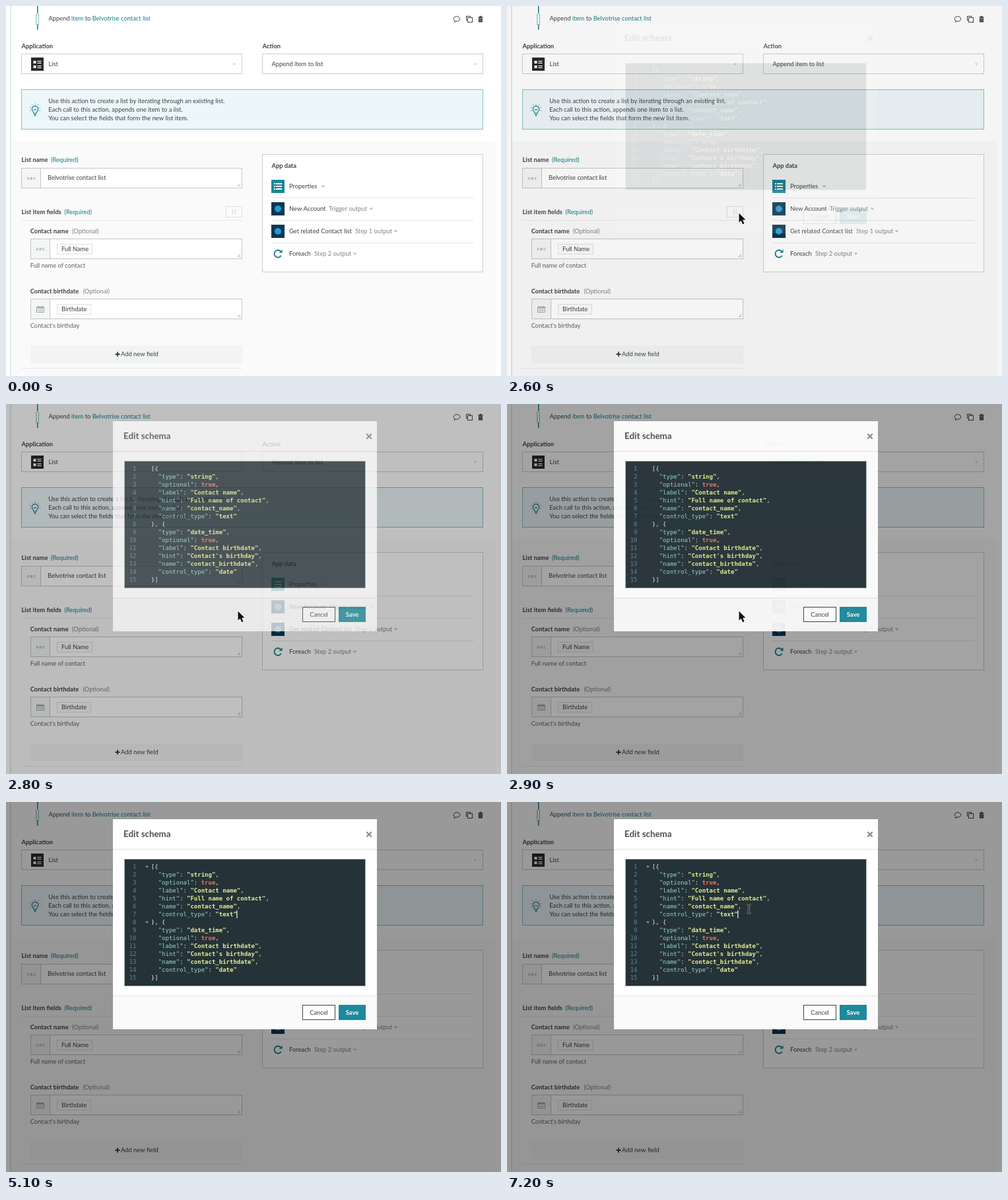
These frames come from a looping animation (750x560 px, 7.3 s). An HTML page with a canvas:

```html
<!DOCTYPE html>
<html lang="en">
<head>
<meta charset="utf-8">
<style>
html, body { margin: 0; width: 100%; height: 100%; overflow: hidden; background: #fff; }
canvas { display: block; width: 750px; height: 560px; }
</style>
</head>
<body>
<canvas id="stage" width="750" height="560"></canvas>
<script>
const W = 750, H = 560, LOOP = 7300, STEP = 100;
const INK = '#3d4242', GREY = '#7f8383', TEAL = '#127a89', RULE = '#cbcdcd';
const SANS = 'Lato, sans-serif', MONO = '"DejaVu Sans Mono", monospace';
const BODY = `9.36px ${SANS}`, BOLD = `bold 9.36px ${SANS}`;
const LIST = 'Belvotrise contact list';

const stage = document.getElementById('stage').getContext('2d');
let g = stage;

function layer(draw) {
  const canvas = document.createElement('canvas');
  canvas.width = W;
  canvas.height = H;
  g = canvas.getContext('2d');
  draw();
  g = stage;
  return canvas;
}

// y is the middle of the capitals; returns the x where the text ends
function text(s, x, y, color = INK, font = BODY, align = 'left') {
  g.font = font;
  g.fillStyle = color;
  g.textAlign = align;
  g.fillText(s, x, y + 3.2);
  return x + g.measureText(s).width;
}

function rect(x, y, w, h, color) {
  g.fillStyle = color;
  g.fillRect(x, y, w, h);
}

function frame(x, y, x2, y2, fill, border = RULE) {
  rect(x, y, x2 - x, y2 - y, fill);
  g.strokeStyle = border;
  g.lineWidth = 1;
  g.strokeRect(x + .5, y + .5, x2 - x - 1, y2 - y - 1);
}

function path(points, color, width = 1) {
  g.beginPath();
  points.forEach(([x, y]) => g.lineTo(x, y));
  g.strokeStyle = color;
  g.lineWidth = width;
  g.stroke();
}

function dot(x, y, r, color) {
  g.beginPath();
  g.arc(x, y, r, 0, 7);
  g.fillStyle = color;
  g.fill();
}

function arc(x, y, r, from, to, color, width) {
  g.beginPath();
  g.arc(x, y, r, from, to);
  g.strokeStyle = color;
  g.lineWidth = width;
  g.stroke();
}

function triangle(x, y, r, color) {
  g.beginPath();
  g.moveTo(x - r, y - r / 2);
  g.lineTo(x + r, y - r / 2);
  g.lineTo(x, y + r / 2 + .5);
  g.fillStyle = color;
  g.fill();
}

function dotted(x, x2, y, color = '#d6d8d8') {
  g.setLineDash([1, 1]);
  path([[x, y + .5], [x2, y + .5]], color);
  g.setLineDash([]);
}

function select(x, label, value, valueX) {
  text(label, x + .5, 61, INK, BOLD);
  frame(x, 72, x + 335, 103, '#fff');
  text(value, valueX, 88);
  triangle(x + 323, 88, 2.3, '#cfd1d1');
}

function input(x, y, addonEnd) {
  frame(x, y, 358, y + 31, '#fff', '#c4c6c6');
  frame(x, y, addonEnd, y + 31, '#f4f5f5', '#c4c6c6');
  path([[350.5, y + 28], [355, y + 23.5]], '#999', .8);
  path([[353, y + 28], [355, y + 26]], '#999', .8);
}

function abc(x, y) {
  ['A', 'B', 'C'].forEach((s, i) =>
    text(s, x + (i - 1) * 5, y - 1, '#999', `bold 5.4px ${SANS}`, 'center'));
}

function pill(s, x2, y) {
  frame(77, y - 8, x2, y + 8, '#fcfcfc', '#dfe1e1');
  text(s, 84, y);
}

function headerIcons() {
  // speech bubble
  g.beginPath();
  g.ellipse(683, 19.5, 4.8, 3.7, 0, 2.2, 8.1);
  g.lineTo(679, 24.3);
  g.closePath();
  g.strokeStyle = '#444';
  g.lineWidth = 1;
  g.stroke();
  // copy
  g.strokeRect(697.5, 15.5, 6, 6);
  frame(699, 17, 707, 25, '#fff', '#444');
  // bin
  rect(715.5, 16.5, 7, 1.4, '#333');
  rect(717.5, 15, 3, 1.5, '#333');
  rect(716, 18.5, 6, 6, '#333');
  [717.6, 719, 720.4].forEach(x => rect(x - .2, 19.4, .5, 4, '#ccc'));
}

function bulb() {
  arc(44, 156, 4.7, 2.2, 7.2, TEAL, 1.2);
  path([[41.2, 159.8], [42, 162.5], [46, 162.5], [46.8, 159.8]], TEAL, 1.2);
  path([[42, 164.5], [46, 164.5]], TEAL, 1.1);
  path([[43, 166], [45, 166]], TEAL, 1);
  path([[42, 156], [43.3, 158], [44, 156], [44.7, 158], [46, 156]], TEAL, .7);
  for (let i = 0; i < 7; i++) {
    const a = Math.PI * (.9 + i * .2);
    dot(44 + 7.6 * Math.cos(a), 156 + 7.6 * Math.sin(a), .6, TEAL);
  }
}

function calendar() {
  g.strokeStyle = '#a6a9a9';
  g.lineWidth = 1;
  g.strokeRect(46.5, 455.5, 11, 8);
  rect(46.5, 455.5, 11, 2, '#a6a9a9');
  [49.5, 52, 54.5].forEach(x => path([[x, 457], [x, 463]], '#b4b6b6', .7));
  path([[47, 460.5], [57, 460.5]], '#b4b6b6', .7);
  [49, 55].forEach(x => rect(x - .5, 453.5, 1, 2, '#a6a9a9'));
}

function dataRow(y, label, note, noteX, caretX) {
  text(label, 429, y);
  if (note) text(note, noteX, y, GREY);
  triangle(caretX, y, 3, '#bfc2c2');
  if (y < 370) dotted(403, 709, y + 17, '#c8caca');
}

function drawPage() {
  rect(0, 0, W, H, '#fff');
  rect(7, 205, 735, H - 205, '#fafafa');
  rect(6.5, 0, 1, H, '#b5d7da');

  rect(47, 0, 1.5, 11, TEAL);
  rect(47, 28, 1.5, 8, TEAL);
  for (let y = 12; y < 28; y += 2.5)
    for (const x of [45.2, 48.8]) rect(x, y, 1.2, 1.2, TEAL);
  let x = text('Append ', 64.5, 19);
  x = text('item', x, 19, TEAL);
  x = text(' to ', x, 19);
  text(LIST, x, 19, TEAL);
  headerIcons();

  select(23, 'Application', 'List', 64.5);
  select(388, 'Action', 'Append item to list', 402.5);
  rect(38, 78, 19, 20, '#292b2c');
  for (const y of [83, 90]) {
    rect(41.5, y, 4, 4, '#fff');
    rect(47.5, y, 6, 1.2, '#fff');
    rect(47.5, y + 2.8, 6, 1.2, '#fff');
  }

  frame(23, 126, 723, 187, '#edf6f9', '#84bfca');
  bulb();
  ['Use this action to create a list by iterating through an existing list.',
   'Each call to this action, appends one item to a list.',
   'You can select the fields that form the new list item.']
    .forEach((s, i) => text(s, 64.2, 143.5 + i * 13));

  text('List name', 23.5, 232.5, INK, BOLD);
  text('(Required)', 68, 232.5, TEAL);
  input(23, 245, 53);
  abc(38.5, 261);
  text(LIST, 63, 260);

  text('List item fields', 23.5, 311.5, INK, BOLD);
  text('(Required)', 88.5, 311.5, TEAL);
  frame(333, 303, 358, 320, '#fcfcfc', '#dcdede');
  text('{;}', 345.5, 310.5, '#b9bcbc', `8px ${SANS}`, 'center');
  dotted(23, 358, 324);

  text('Contact name', 36.7, 340.5, INK, BOLD);
  text('(Optional)', 100, 340.5, GREY);
  input(37, 352, 67);
  abc(52, 368);
  pill('Full Name', 131, 368);
  text('Full name of contact', 36.7, 392.5, '#5c6161');

  text('Contact birthdate', 36.7, 431.5, INK, BOLD);
  text('(Optional)', 116.5, 431.5, GREY);
  input(37, 443, 67);
  calendar();
  pill('Birthdate', 129, 459);
  text("Contact's birthday", 36.7, 483.5, '#5c6161');

  rect(37, 514, 321, 27, '#f2f4f4');
  rect(165.5, 526, 7, 2, INK);
  rect(168, 523.5, 2, 7, INK);
  text('Add new field', 174, 527);
  dotted(23, 358, 548);

  frame(388, 224, 723, 403, '#fff');
  text('App data', 402.5, 241.5, INK, BOLD);
  rect(402, 263, 20, 20, '#1b8798');
  for (const y of [268, 272, 276]) {
    rect(406, y, 2, 2, '#fff');
    rect(409, y, 9, 2, '#fff');
  }
  for (const y of [307, 341]) {
    rect(402, y - 10, 20, 20, '#0b3650');
    dot(412, y, 5, '#1c9bd7');
  }
  arc(412, 375, 5.5, .5, 5.5, TEAL, 1.8);
  g.beginPath();
  g.moveTo(418.5, 368.5);
  g.lineTo(418.5, 373.5);
  g.lineTo(413.5, 373.5);
  g.fillStyle = TEAL;
  g.fill();
  dataRow(273, 'Properties', '', 0, 480.5);
  dataRow(307, 'New Account', 'Trigger output', 489, 553.5);
  dataRow(341, 'Get related Contact list', 'Step 1 output', 529, 590.5);
  dataRow(375, 'Foreach', 'Step 2 output', 467, 528.5);
}

const CODE = `[{
  "type": "string",
  "optional": true,
  "label": "Contact name",
  "hint": "Full name of contact",
  "name": "contact_name",
  "control_type": "text"
}, {
  "type": "date_time",
  "optional": true,
  "label": "Contact birthdate",
  "hint": "Contact's birthday",
  "name": "contact_birthdate",
  "control_type": "date"
}]`.split('\n');

function codeLine(line, i) {
  const y = 98 + i * 12, plain = `9px ${MONO}`, bold = 'bold ' + plain;
  text(i + 1, 197.5, y, '#66838b', plain, 'right');
  let x = 219.8, isKey = true;
  for (const s of line.match(/"[^"]*"|true|[^"\s]+|\s+/g)) {
    if (s === 'true') x = text(s, x, y, '#f0745c', bold);
    else if (s[0] !== '"') x = text(s, x, y, '#dfe6e6', plain);
    else if (isKey) x = text(s, x, y, '#93d6cd', plain);
    else x = text(s, x, y, '#e3ef93', bold);
    if (s[0] === '"') isKey = false;
  }
}

function drawDialog() {
  rect(162, 26, 400, 318, '#fff');
  rect(162, 71, 400, 1, '#e2e4e4');
  rect(162, 293, 400, 51, '#fafafa');
  rect(162, 293, 400, 1, '#e2e4e4');
  text('Edit schema', 178, 49.3, '#4a4e4e', `bold 13.36px ${SANS}`);
  path([[546.3, 45.3], [553.7, 52.7]], '#858989', 2);
  path([[546.3, 52.7], [553.7, 45.3]], '#858989', 2);
  frame(179, 86, 545, 279, '#253237', '#a9b0b2');
  CODE.forEach(codeLine);
  frame(449, 307, 499, 330, '#fff', '#3d4242');
  text('Cancel', 474, 318.5, INK, BODY, 'center');
  rect(504, 307, 41, 23, '#1d8a9c');
  text('Save', 524.5, 318.5, '#fff', BOLD, 'center');
}

function drawArrow(x, y) {
  g.beginPath();
  [[0, 0], [0, 14], [3.2, 11.2], [5.6, 16.8], [8, 15.8], [5.7, 10.3], [10, 10.1]]
    .forEach(([dx, dy]) => g.lineTo(x + dx, y + dy));
  g.closePath();
  g.lineJoin = 'round';
  g.strokeStyle = '#fff';
  g.lineWidth = 2;
  g.stroke();
  g.fillStyle = '#111';
  g.fill();
}

function drawBeam(x, y) {
  for (const [color, width] of [['#a3abad', 2.4], ['#101518', 1.1]]) {
    path([[x - 3, y - 7], [x, y - 5.5], [x + 3, y - 7]], color, width);
    path([[x, y - 5.5], [x, y + 5.5]], color, width);
    path([[x - 3, y + 7], [x, y + 5.5], [x + 3, y + 7]], color, width);
    path([[x - 1.8, y + 2], [x + 1.8, y + 2]], color, width);
  }
}

// rows of [time, ...values], linear in between
function at(keys, t) {
  const i = keys.findIndex(k => k[0] > t);
  if (i === 0) return keys[0].slice(1);
  if (i < 0) return keys[keys.length - 1].slice(1);
  const a = keys[i - 1], b = keys[i], p = (t - a[0]) / (b[0] - a[0]);
  return a.slice(1).map((v, j) => v + (b[j + 1] - v) * p);
}

const POINTER = [
  [800, 738, 497], [1000, 640, 440], [1200, 560, 412], [1400, 487, 394],
  [1600, 425, 360], [1900, 370, 325], [2200, 351.5, 313.5], [3400, 351.5, 313.5],
  [3700, 362, 200], [4000, 366.5, 138.5], [4200, 366.5, 138.5], [4500, 366.5, 162]
];
const FADE = [
  [2500, 0, 0], [2600, .1, .04], [2700, .36, .12], [2800, .75, .25],
  [2900, .95, .36], [3000, 1, .4]
];

const page = layer(drawPage), dialog = layer(drawDialog);

function render(t) {
  g.drawImage(page, 0, 0);
  const [shown, shade] = at(FADE, t);
  if (shown > 0) {
    rect(0, 0, W, H, `rgba(0,0,0,${shade})`);
    g.globalAlpha = shown;
    g.drawImage(dialog, 0, 0);
    g.globalAlpha = 1;
  }
  if (t >= 3400) for (const y of [98, 182]) triangle(213.5, y, 2.4, '#8fa3a8');
  if (t >= 4700 && t % 1000 < 500) rect(349.3, 164, 1.2, 12, '#f2f4f4');

  const [x, y] = at(POINTER, t);
  const typing = t >= 5000 && t < 6800;
  if (t < 800 || typing) return;
  if (t > 3400 && y < 279) drawBeam(x, y);
  else drawArrow(x, y);
}

const start = performance.now();
function tick() {
  const t = (performance.now() - start) % LOOP;
  render(Math.floor(t / STEP) * STEP);
  requestAnimationFrame(tick);
}
tick();
</script>
</body>
</html>
```
